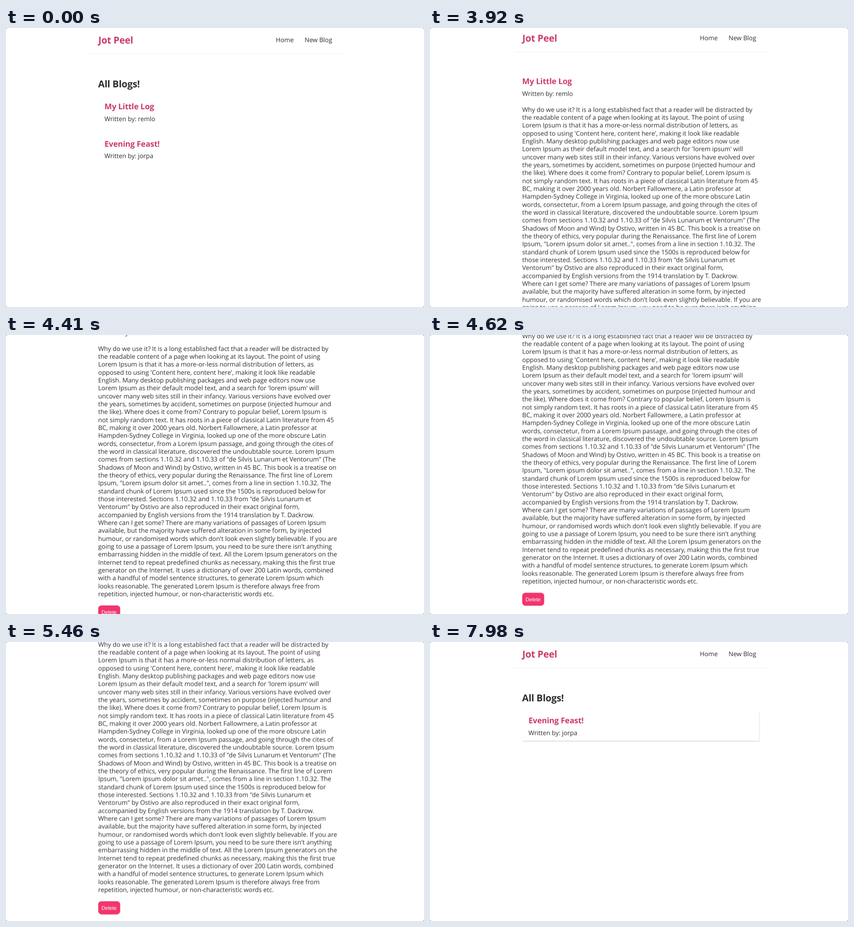
An HTML page that plays this animation: 917x611 px, repeating every 8000 ms.

```html
<!DOCTYPE html>
<html lang="en">
<head>
<meta charset="utf-8">
<title>Blog list</title>
<style>
  html, body { margin: 0; width: 100%; height: 100%; overflow: hidden; background: #444; }
  svg { display: block; width: 917px; height: 611px; background: #fff; border-radius: 3px; overflow: hidden; }
  text { font: 400 13.87px "Open Sans", "Noto Sans", sans-serif; letter-spacing: -.0027em; fill: #2e2e2e; white-space: pre; text-rendering: geometricPrecision; }
  .logo, .head, .title { font-weight: 700; letter-spacing: -.01em; }
  .logo, .head { font-size: 20.8px; }
  .title { font-size: 17.33px; }
  .logo, .title { fill: #cb3a66; }
  .btn { font: 11.56px "Liberation Sans", Arial, sans-serif; letter-spacing: 0; fill: #fff; }
  .card { fill: #fff; filter: drop-shadow(1px 2.6px 1.2px rgba(0, 0, 0, .13)); }
</style>
</head>
<body>
<svg id="stage" viewBox="0 0 917 611"></svg>
<script>
const LOOP = 8000, TICK = 70;
const OPEN = 3010, REMOVED = 7070;
const LINE = 17.333;

const article = `Why do we use it? It is a long established fact that a reader will be distracted by
the readable content of a page when looking at its layout. The point of using
Lorem Ipsum is that it has a more-or-less normal distribution of letters, as
opposed to using 'Content here, content here', making it look like readable
English. Many desktop publishing packages and web page editors now use
Lorem Ipsum as their default model text, and a search for 'lorem ipsum' will
uncover many web sites still in their infancy. Various versions have evolved over
the years, sometimes by accident, sometimes on purpose (injected humour and
the like). Where does it come from? Contrary to popular belief, Lorem Ipsum is
not simply random text. It has roots in a piece of classical Latin literature from 45
BC, making it over 2000 years old. Norbert Fallowmere, a Latin professor at
Hampden-Sydney College in Virginia, looked up one of the more obscure Latin
words, consectetur, from a Lorem Ipsum passage, and going through the cites of
the word in classical literature, discovered the undoubtable source. Lorem Ipsum
comes from sections 1.10.32 and 1.10.33 of "de Silvis Lunarum et Ventorum" (The
Shadows of Moon and Wind) by Ostivo, written in 45 BC. This book is a treatise on
the theory of ethics, very popular during the Renaissance. The first line of Lorem
Ipsum, "Lorem ipsum dolor sit amet..", comes from a line in section 1.10.32. The
standard chunk of Lorem Ipsum used since the 1500s is reproduced below for
those interested. Sections 1.10.32 and 1.10.33 from "de Silvis Lunarum et
Ventorum" by Ostivo are also reproduced in their exact original form,
accompanied by English versions from the 1914 translation by T. Dackrow.
Where can I get some? There are many variations of passages of Lorem Ipsum
available, but the majority have suffered alteration in some form, by injected
humour, or randomised words which don't look even slightly believable. If you are
going to use a passage of Lorem Ipsum, you need to be sure there isn't anything
embarrassing hidden in the middle of text. All the Lorem Ipsum generators on the
Internet tend to repeat predefined chunks as necessary, making this the first true
generator on the Internet. It uses a dictionary of over 200 Latin words, combined
with a handful of model sentence structures, to generate Lorem Ipsum which
looks reasonable. The generated Lorem Ipsum is therefore always free from
repetition, injected humour, or non-characteristic words etc.`.split("\n");

function add(parent, tag, attrs = {}, content = "") {
  const el = document.createElementNS("http://www.w3.org/2000/svg", tag);
  for (const key in attrs) el.setAttribute(key, attrs[key]);
  el.textContent = content;
  return parent.appendChild(el);
}

const label = (parent, x, y, content, cls = "") =>
  add(parent, "text", { x, y, class: cls }, content);

function preview(parent, y, title, author) {
  label(parent, 216, y, title, "title");
  label(parent, 216, y + 25.2, "Written by: " + author);
}

// Hard visibility changes: [time, shown] pairs
function show(el, steps) {
  el.animate(
    steps.concat([[LOOP, steps.at(-1)[1]]]).map(([t, on]) =>
      ({ offset: t / LOOP, opacity: on, easing: "step-end" })),
    { duration: LOOP, iterations: Infinity });
}

const stage = document.getElementById("stage");
const page = add(stage, "g");

// Home view
const home = add(page, "g");
const hover = add(home, "rect", { class: "card", x: 202.5, y: 153, width: 519.5, height: 63, rx: 1 });
label(home, 202, 130, "All Blogs!", "head");
const both = add(home, "g");
preview(both, 178.3, "My Little Log", "remlo");
preview(both, 259.6, "Evening Feast!", "jorpa");
const rest = add(home, "g");
preview(rest, 178.3, "Evening Feast!", "jorpa");

// Article view
const detail = add(page, "g");
label(detail, 202.3, 126.6, "My Little Log", "title");
label(detail, 202.3, 153.2, "Written by: remlo");
article.forEach((s, i) => label(detail, 202.3, 187.8 + i * LINE, s));
add(detail, "rect", { x: 202.3, y: 745.2, width: 48.2, height: 28.6, rx: 7, fill: "#f1356d" });
label(detail, 209.4, 763.6, "Delete", "btn");

// Shared header
label(page, 202.5, 34, "Jot Peel", "logo");
label(page, 592, 31.3, "Home");
label(page, 655, 31.3, "New Blog");
add(page, "rect", { x: 184.5, y: 56, width: 555, height: 1, fill: "#f2f2f2" });

show(home, [[0, 1], [OPEN, 0], [REMOVED, 1]]);
show(both, [[0, 1], [OPEN, 0]]);
show(rest, [[0, 0], [REMOVED, 1]]);
show(detail, [[0, 0], [OPEN, 1], [REMOVED, 0]]);
show(hover, [[0, 0], [2240, 1], [OPEN, 0], [7980, 1]]);

// Scroll with momentum, a small overshoot and a slow settle
const scroll = [
  [3850, 0], [3920, 4.3], [3990, 21], [4060, 47], [4200, 100.4], [4340, 140],
  [4480, 166], [4620, 180.8], [4690, 182], [4830, 180], [4970, 178.4],
  [5110, 178.4], [5460, 177.5]
];

function scrollAt(t) {
  const i = scroll.findIndex(k => k[0] >= t);
  const [t1, y1] = scroll[i];
  if (t1 === t) return y1;
  const [t0, y0] = scroll[i - 1];
  return y0 + (y1 - y0) * (t - t0) / (t1 - t0);
}

const frame = (t, y) =>
  ({ offset: t / LOOP, transform: `translate(0px, ${-y}px)`, easing: "step-end" });
const frames = [frame(0, 0)];
for (let t = 3920; t <= 5460; t += TICK) frames.push(frame(t, scrollAt(t)));
frames.push(frame(REMOVED, 0), frame(LOOP, 0));
page.animate(frames, { duration: LOOP, iterations: Infinity });
</script>
</body>
</html>
```
